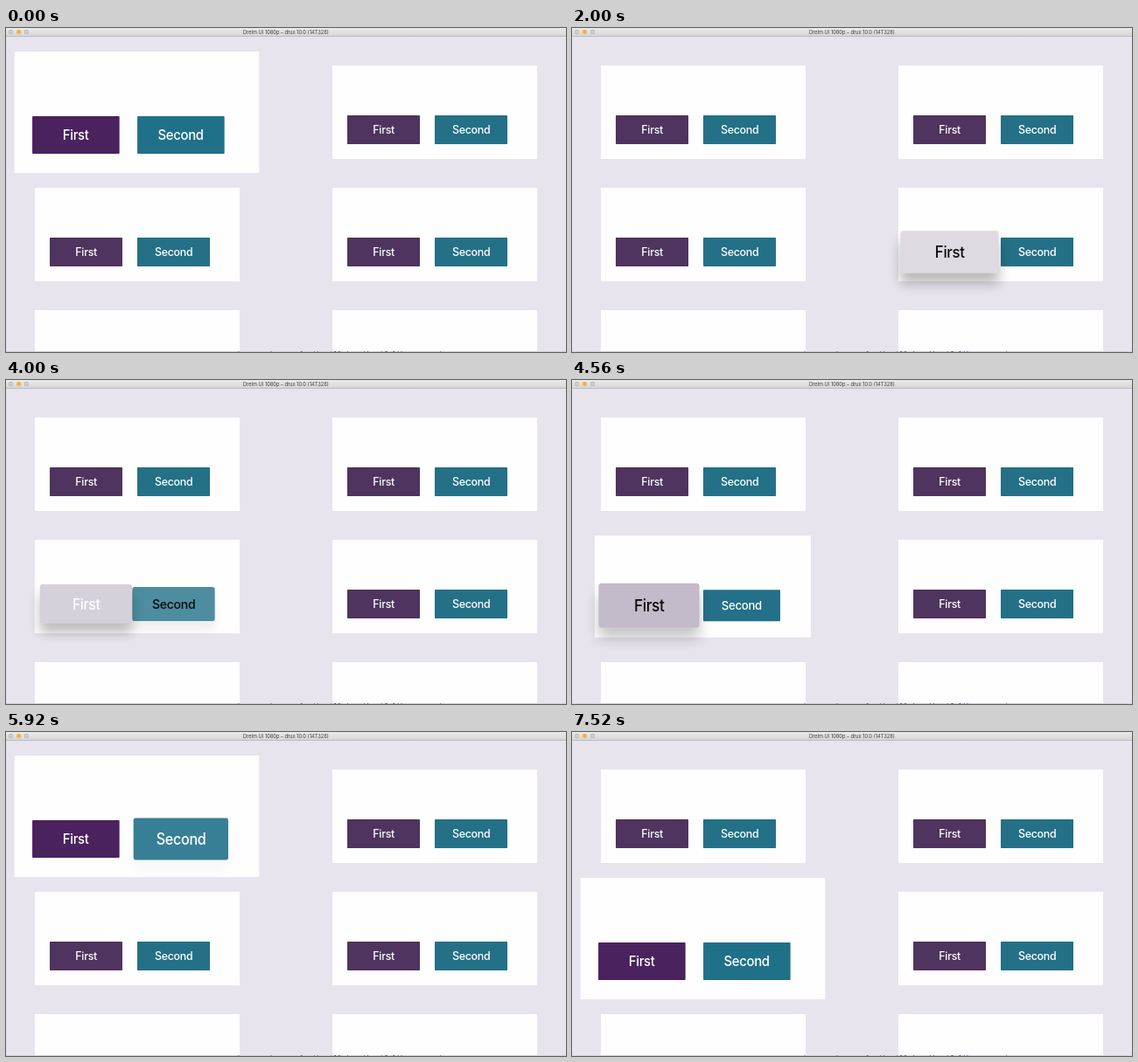
These frames come from a looping animation (640 by 371 pixels, 7600 ms). An HTML page:

```html
<!DOCTYPE html>
<html lang="en">
<head>
<meta charset="utf-8">
<title>Focus grid</title>
<style>
  html, body { margin: 0; width: 100%; height: 100%; overflow: hidden; }
  body { position: relative; background: #e8e4ee; font-family: Inter, Roboto, sans-serif; }
  .bar {
    position: absolute; z-index: 5; left: 0; top: 0; width: 640px; height: 10px;
    box-sizing: border-box; border-bottom: .5px solid #bbb;
    background: linear-gradient(#ebebeb, #d6d6d6);
    font-size: 5.7px; line-height: 10px; text-align: center; color: #3c3c3c;
  }
  .bar i { position: absolute; top: 2.4px; width: 5px; height: 5px; border-radius: 50%; background: #cfcfcf; box-shadow: inset 0 0 0 .4px #aaa; }
  .bar i:nth-of-type(1) { left: 3px; }
  .bar i:nth-of-type(2) { left: 12px; background: #f3b13c; box-shadow: none; }
  .bar i:nth-of-type(3) { left: 21px; }
  .edge { position: absolute; z-index: 5; right: 0; top: 10px; width: .5px; height: 361px; background: #aaa; }
  .under {
    position: absolute; z-index: 5; left: 0; top: 370px; width: 640px; height: 1px; overflow: hidden;
    background: #d2cfd8; color: #2626c8; white-space: pre;
    font: 8px/8px "Liberation Mono", monospace;
  }
  .under span { position: absolute; left: 230px; top: -1px; }
  .tile { position: absolute; width: 233.33px; height: 106.67px; background: #fefefe; }
  .btn {
    position: absolute; top: 56.67px; width: 83.33px; height: 33.33px;
    font-size: 12.4px; font-weight: 500; letter-spacing: -.25px; line-height: 33.33px; text-align: center;
  }
  .btn:first-child { left: 16.67px; }
  .btn:last-child { left: 116.67px; }
</style>
</head>
<body>
<div class="bar"><i></i><i></i><i></i>Drelm UI 1080p – drux 10.0 (14T328)</div>
<div class="edge"></div>
<div class="under"><span>an opening nearby panel; it will tap the if like every inner</span></div>
<script>
const LOOP = 7600;
const FIRST = 0, SECOND = 1, TILE = 2;

// Focus path: [time, tile, part]
const path = [
  [-1000, 0, TILE], [40, 1, FIRST], [850, 1, SECOND], [1400, 1, TILE],
  [1640, 3, FIRST], [2430, 3, SECOND], [2785, 3, TILE],
  [3240, 2, SECOND], [3850, 2, FIRST], [4535, 2, TILE],
  [4690, 0, FIRST], [5330, 0, SECOND], [5720, 0, TILE],
  [6120, 2, FIRST], [6480, 2, SECOND], [6840, 2, TILE]
];

const styles = [
  { label: 'First', rest: [78, 52, 94], lifted: [74, 34, 94], focus: [223, 218, 226] },
  { label: 'Second', rest: [36, 112, 135], lifted: [33, 112, 138], focus: [211, 232, 237] }
];

const clamp = v => Math.min(1, Math.max(0, v));
const easeOut = v => 1 - (1 - clamp(v)) ** 2;
const mix = (a, b, k) => a + (b - a) * k;
const blend = (a, b, k) => a.map((v, i) => mix(v, b[i], k));

function add(parent, name, text = '') {
  const el = document.createElement('div');
  el.className = name;
  el.textContent = text;
  return parent.appendChild(el);
}

const tiles = Array.from({ length: 6 }, (_, i) => {
  const el = add(document.body, 'tile');
  el.style.left = 33.33 + 340 * (i % 2) + 'px';
  el.style.top = 43.33 + 140 * Math.floor(i / 2) + 'px';
  return { el, buttons: styles.map(s => add(el, 'btn', s.label)) };
});

// Latest gain or loss of focus for one part
function focusOf(tile, part, t) {
  let on = false, since = Infinity;
  for (const [start, i, p] of path) {
    if (start > t) break;
    const hit = i === tile && p === part;
    if (hit !== on) {
      on = hit;
      since = t - start;
    }
  }
  const level = (gain, loss) => on ? easeOut(since / gain) : 1 - easeOut(since / loss);
  return { on, since, level };
}

function drawButton(el, style, focus, lift) {
  const { on, since, level } = focus;
  const size = level(300, 400);
  const tint = on ? level(200, 400) : size ** 1.5;
  const dark = on === since > 165;
  const color = blend(blend(style.rest, style.lifted, lift), style.focus, tint);
  Object.assign(el.style, {
    transform: `scale(${mix(1, 1.355, size)}, ${mix(1, 1.47, size)})`,
    background: `rgb(${color})`,
    color: dark ? '#0a0a0a' : '#fff',
    borderRadius: mix(.7, 2.4, clamp(size * 3)) + 'px',
    boxShadow: tint ? `0 8px 10px rgba(0, 0, 0, ${.27 * tint})` : 'none',
    zIndex: on ? 2 : size ? 1 : 0
  });
}

function draw(now) {
  const t = now % LOOP;
  tiles.forEach(({ el, buttons }, i) => {
    const lift = focusOf(i, TILE, t).level(160, 320);
    const parts = styles.map((_, p) => focusOf(i, p, t));
    el.style.transform = `scale(${1 + .2 * lift}, ${1 + .3 * lift})`;
    el.style.zIndex = lift || parts.some(p => p.on) ? 1 : 0;
    buttons.forEach((b, p) => drawButton(b, styles[p], parts[p], lift));
  });
}

const begin = performance.now();
function tick() {
  draw(performance.now() - begin);
  requestAnimationFrame(tick);
}
tick();
</script>
</body>
</html>
```
